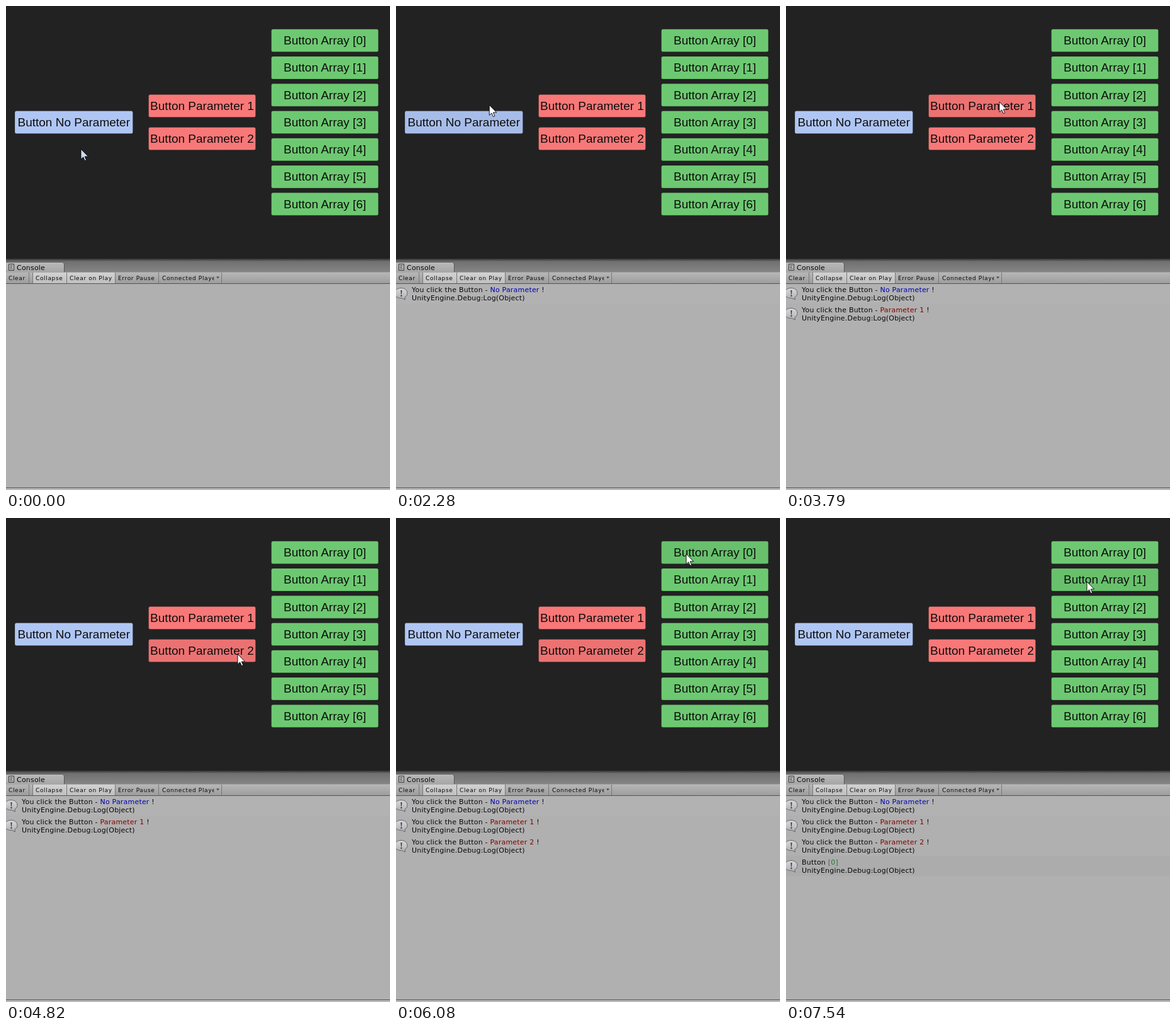
These frames come from a looping animation (610 px wide and 768 px high, 8 s). An HTML page:

```html
<!DOCTYPE html>
<html lang="en">
<head>
<meta charset="utf-8">
<title>Button events</title>
<style>
  html, body { margin: 0; width: 100%; height: 100%; overflow: hidden; background: #222; }
  svg { display: block; width: 610px; height: 768px; }
  text { white-space: pre; }
  .button text { font: 19px "Liberation Sans", Arial, sans-serif; text-anchor: middle; fill: #0d0d0d; }
  .button rect { stroke: #000; stroke-opacity: .22; }
  .ui { font: 11px "DejaVu Sans", sans-serif; letter-spacing: .2px; fill: #080808; }
  .small { font-size: 9px; letter-spacing: .65px; }
  .bang { font: bold 15px "Liberation Serif", serif; text-anchor: middle; fill: #343a46; }
</style>
</head>
<body>
<svg viewBox="0 0 610 768">
  <defs>
    <linearGradient id="edge" x2="0" y2="1">
      <stop stop-color="#333"/><stop offset=".2" stop-color="#707070"/><stop offset="1" stop-color="#868686"/>
    </linearGradient>
    <linearGradient id="tab" x2="0" y2="1">
      <stop stop-color="#b9b9b9"/><stop offset="1" stop-color="#a6a6a6"/>
    </linearGradient>
    <linearGradient id="bar" x2="0" y2="1">
      <stop stop-color="#b8b8b8"/><stop offset="1" stop-color="#9c9c9c"/>
    </linearGradient>
    <linearGradient id="active" x2="0" y2="1">
      <stop stop-color="#d2d2d2"/><stop offset="1" stop-color="#c0c0c0"/>
    </linearGradient>
    <linearGradient id="bubble" x2="0" y2="1">
      <stop stop-color="#d8d8d8"/><stop offset="1" stop-color="#aeb0b4"/>
    </linearGradient>
    <clipPath id="dropdown"><path d="M243 423h87.5v17H243z"/></clipPath>
  </defs>

  <rect width="610" height="402" fill="#222"/>
  <g id="buttons"></g>

  <rect y="401" width="610" height="22" fill="url(#edge)"/>
  <path d="M-1 422.5V406.5H89Q92.5 406.5 92.5 410V422.5" fill="url(#tab)" stroke="#555"/>
  <path d="M4.5 409.5h8v10h-8zM6 412h5M6 414.5h4M6 417h5" fill="#c8c8c8" stroke="#333"/>
  <text class="ui" x="17" y="419">Console</text>
  <rect y="422.5" width="610" height="18" fill="url(#bar)"/>
  <rect x="43" y="423" width="130" height="17" fill="url(#active)"/>
  <path d="M36.5 423v17M42.5 423v17M96.5 423v17M173.5 423v17M242.5 423v17M342.5 423v17" stroke="#777"/>
  <g class="ui small">
    <text x="4" y="435">Clear</text>
    <text x="47" y="435">Collapse</text>
    <text x="101" y="435">Clear on Play</text>
    <text x="178" y="435">Error Pause</text>
    <text x="248" y="435" clip-path="url(#dropdown)">Connected Player</text>
  </g>
  <path d="M334 429.5h5l-2.5 3z" fill="#444"/>

  <rect y="440" width="610" height="328" fill="#b0b0b0"/>
  <g id="logs"></g>
  <path d="M0 440.5H610" stroke="#555"/>
  <rect y="765" width="610" height="3" fill="#b8b8b8"/>
  <path d="M0 764.5H610" stroke="#555"/>
  <path id="cursor" d="M0 0V16.3L3.7 12.8L6.2 18.6L8.7 17.5L6.2 11.9H11.6Z" stroke="#000" stroke-width=".9"/>
</svg>
<script>
const LOOP = 8000;
const BLUE = [175, 198, 244], RED = [248, 120, 120], GREEN = [109, 201, 113];
const NORMAL = 1, HOVER = .953, PRESSED = .42;
const $ = id => document.getElementById(id);

function add(parent, tag, attrs = {}, text = '') {
  const el = document.createElementNS('http://www.w3.org/2000/svg', tag);
  for (const name in attrs) el.setAttribute(name, attrs[name]);
  el.textContent = text;
  return parent.appendChild(el);
}

// Each state is [start, brightness, fade duration].
function button(label, x, y, width, color, states = []) {
  const g = add($('buttons'), 'g', { class: 'button' });
  const rect = add(g, 'rect', { x: x + .5, y: y + .5, width: width - 1, height: 36, rx: 2.5 });
  add(g, 'text', { x: x + width / 2, y: y + 25 }, label);
  return { rect, color, states };
}

const click = (down, up) => [[down, PRESSED, 110], [up, HOVER, 60]];
const arrayStates = [
  [[5980, HOVER, 100], ...click(6770, 6990), [7370, NORMAL, 100]],
  [[7400, HOVER, 100]]
];
const buttons = [
  button('Button No Parameter', 13.5, 166, 188.5, BLUE,
    [[430, HOVER, 100], ...click(1390, 1565), [3540, NORMAL, 0]]),
  button('Button Parameter 1', 226, 140, 171, RED,
    [[2880, HOVER, 100], ...click(3300, 3540), [3900, NORMAL, 80]]),
  button('Button Parameter 2', 226, 192, 171, RED,
    [[3920, HOVER, 100], ...click(4820, 5035), [6990, NORMAL, 0]]),
  ...Array.from({ length: 7 }, (_, i) =>
    button(`Button Array [${i}]`, 421, 36.2 + 43.25 * i, 171, GREEN, arrayStates[i]))
];

function logRow(index, time, back, prefix, name, color, suffix = '') {
  const g = add($('logs'), 'g', { transform: `translate(0 ${440 + 32 * index})` });
  add(g, 'rect', { width: 610, height: 32, fill: back });
  add(g, 'path', {
    d: 'M8 7.5C14 7.5 18 11 18 15.5C18 18.5 16.5 20.5 14 22L14.5 26L9.5 23.5C2 24 -2 20.5 -2 15.5C-2 11 2 7.5 8 7.5Z',
    fill: 'url(#bubble)', stroke: '#666'
  });
  add(g, 'text', { class: 'bang', x: 8.5, y: 20.5 }, '!');
  const line = add(g, 'text', { class: 'ui', x: 25, y: 14 });
  add(line, 'tspan', {}, prefix);
  add(line, 'tspan', { fill: color }, name);
  add(line, 'tspan', {}, suffix);
  add(g, 'text', { class: 'ui', x: 25, y: 27 }, 'UnityEngine.Debug:Log(Object)');
  return { g, time };
}

const clicked = 'You click the Button - ';
const logs = [
  logRow(0, 1565, '#b2b2b2', clicked, 'No Parameter', '#0000b4', ' !'),
  logRow(1, 3540, '#b0b0b0', clicked, 'Parameter 1', '#800000', ' !'),
  logRow(2, 5035, '#b0b0b0', clicked, 'Parameter 2', '#800000', ' !'),
  logRow(3, 6990, '#acacac', 'Button ', '[0]', '#2d7a32')
];

// Cursor moves: start, end, then the points of a line or cubic curve.
const moves = [
  [370, 700, [119, 227], [136, 188]],
  [2130, 2920, [136, 188], [170, 70], [300, 60], [339, 149]],
  [2970, 3020, [339, 149], [339, 150]],
  [3540, 3610, [339, 150], [339, 152]],
  [3790, 4040, [339, 152], [364, 222]],
  [4270, 4500, [364, 222], [368, 216]],
  [5430, 6080, [368, 216], [385, 110], [400, 75], [461, 57]],
  [7180, 7540, [461, 57], [478, 101]]
];

const clamp = v => Math.min(1, Math.max(0, v));
const smooth = u => u * u * (3 - 2 * u);
const mix = (a, b, u) => a + (b - a) * u;

function bezier(points, u) {
  while (points.length > 1)
    points = points.slice(1).map((p, i) => p.map((v, k) => mix(points[i][k], v, u)));
  return points[0];
}

function cursorAt(t) {
  const [start, end, ...points] = moves.findLast(m => t >= m[0]) || moves[0];
  return bezier(points, smooth(clamp((t - start) / (end - start))));
}

function brightness(states, t) {
  let level = NORMAL;
  for (const [start, target, fade] of states)
    if (t >= start) level = mix(level, target, fade ? clamp((t - start) / fade) : 1);
  return level;
}

function draw(now) {
  const t = now % LOOP;
  for (const { rect, color, states } of buttons) {
    const level = brightness(states, t);
    rect.setAttribute('fill', `rgb(${color.map(c => Math.round(c * level))})`);
  }
  for (const { g, time } of logs) g.style.display = t >= time ? '' : 'none';
  const cursor = $('cursor');
  cursor.setAttribute('transform', `translate(${cursorAt(t)})`);
  cursor.setAttribute('fill', t < 370 ? '#cddbf8' : '#fff');
}

const began = performance.now();
function tick() {
  draw(performance.now() - began);
  requestAnimationFrame(tick);
}
tick();
</script>
</body>
</html>
```
